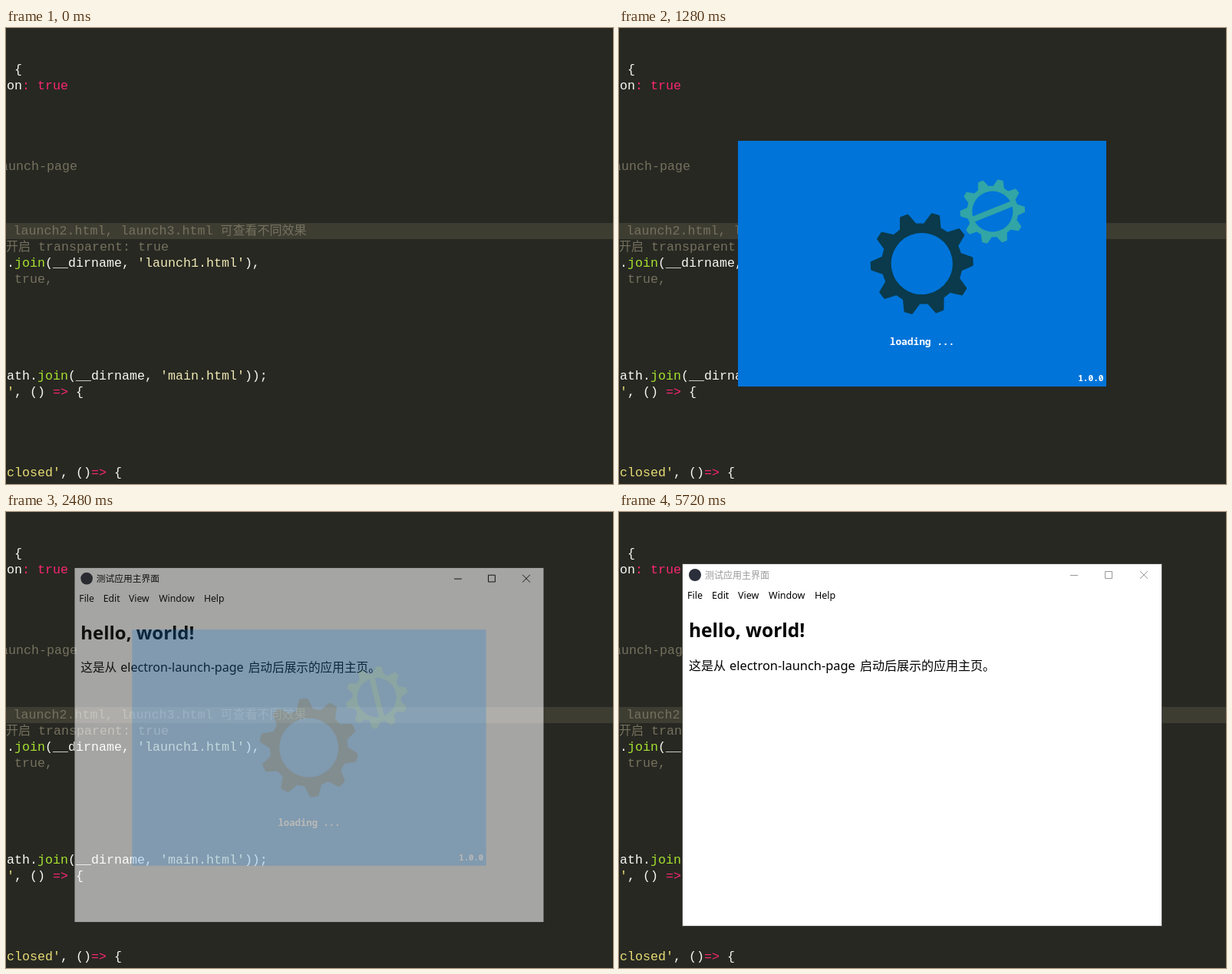
Recreate the animation shown at these times as an HTML page. Size 791 by 594 pixels, loop 5810 ms.

```html
<!DOCTYPE html>
<html lang="zh">
<head>
<meta charset="utf-8">
<title>Launch page</title>
<style>
  html, body { margin: 0; width: 100%; height: 100%; overflow: hidden; background: #272822; }
  svg { display: block; width: 100%; height: 100%; }
  text { white-space: pre; }
  #code { font: 16.667px "Liberation Mono", "Noto Sans CJK SC", "Noto Sans CJK", monospace; fill: #f8f8f2; }
  .comment { fill: #75715e; }
  .cjk { font-size: 16px; }
  .call { fill: #a6e22e; }
  .key { fill: #f92672; }
  .str { fill: #e6db74; }
  .path { fill: #efe8b4; }
  #splash text { font: bold 12.8px "Noto Sans Mono", monospace; fill: #fff; }
  #main { font-family: "Noto Sans", "Noto Sans CJK SC", "Noto Sans CJK", sans-serif; }
  #title { font: 12px "Noto Sans CJK SC", "Noto Sans CJK", sans-serif; }
  .zh { font-family: "Noto Sans CJK SC", "Noto Sans CJK", sans-serif; font-size: 16px; }
</style>
</head>
<body>
<svg viewBox="0 0 791 594">
  <rect width="791" height="594" fill="#272822"/>
  <rect y="254" width="791" height="21" fill="#3e3d32"/>
  <g id="code">
    <text x="11" y="59">{</text>
    <text x="1" y="80">on<tspan class="key">: true</tspan></text>
    <text x="-7" y="185" class="comment">aunch-page</text>
    <text x="9.5" y="269" class="comment">launch2.html, launch3.html <tspan class="cjk">可查看不同效果</tspan></text>
    <text x="0" y="290" class="comment"><tspan class="cjk">开启</tspan> transparent: true</text>
    <text x="-9" y="311">h.<tspan class="call">join</tspan>(__dirname, <tspan class="path">'launch1.html'</tspan>),</text>
    <text x="11" y="332" class="comment">true,</text>
    <text x="1" y="458">ath.<tspan class="call">join</tspan>(__dirname, <tspan class="path">'main.html'</tspan>));</text>
    <text x="1" y="479"><tspan class="str">'</tspan>, () <tspan class="key">=&gt;</tspan> {</text>
    <text x="1" y="584"><tspan class="str">closed'</tspan>, ()<tspan class="key">=&gt;</tspan> {</text>
  </g>

  <g id="main">
    <rect id="frame" x="82.5" y="67.5" width="625" height="472" fill="none"/>
    <rect x="83" y="68" width="624" height="471" fill="#fff"/>
    <circle cx="99" cy="82" r="8" fill="#2b2e3b"/>
    <text id="title" x="112" y="86.7">测试应用主界面</text>
    <path id="buttons" fill="none" d="M588 82.5h10M633.5 77.5h9v9h-9zM679 77l10 10m0-10l-10 10"/>
    <g font-size="12.5">
      <text x="89" y="113">File</text>
      <text x="121" y="113">Edit</text>
      <text x="155" y="113">View</text>
      <text x="195" y="113">Window</text>
      <text x="255" y="113">Help</text>
    </g>
    <text x="91" y="163" font-size="24.5" font-weight="bold">hello, world!</text>
    <text x="91" y="206" class="zh">这是从</text>
    <text x="144" y="206" font-size="16.4">electron-launch-page</text>
    <text x="314" y="206" class="zh">启动后展示的应用主页。</text>
  </g>

  <g id="splash">
    <rect x="155" y="147" width="480" height="320" fill="#0074d9"/>
    <g id="bigGear" fill="#0a3a4b" stroke="#0a3a4b"><path/></g>
    <g id="smallGear" fill="#32a5a6" stroke="#32a5a6">
      <path/>
      <path d="M-28 0H28" stroke-width="7.5"/>
    </g>
    <text x="395" y="412.7" text-anchor="middle">loading ...</text>
    <text x="631.5" y="460" text-anchor="end" style="font-size:11.1px">1.0.0</text>
  </g>
</svg>
<script>
const LOOP = 5810, STEP = 60;
const SPLASH_OPEN = 440, SPLASH_CLOSE = 2360, MAIN_OPEN = 2420, BLUR = 5720;
const el = id => document.getElementById(id);
const clamp = v => Math.max(0, Math.min(1, v));

// Ten-toothed ring; the round-joined stroke softens the corners.
function gearPath(hole, root, tip, offset, stroke) {
  const half = stroke / 2, points = [];
  const add = (r, deg) => {
    const a = deg * Math.PI / 180;
    points.push(`${(r - half) * Math.cos(a)} ${(r - half) * Math.sin(a)}`);
  };
  for (let i = 0; i < 10; i++) {
    const mid = offset + i * 36;
    add(root, mid - 11.5);
    add(tip, mid - 4);
    add(tip, mid + 4);
    add(root, mid + 11.5);
  }
  const r = hole + half;
  return `M${points.join('L')}ZM${r} 0A${r} ${r} 0 1 0 ${-r} 0A${r} ${r} 0 1 0 ${r} 0Z`;
}

function setupGear(id, stroke, ...shape) {
  const path = el(id).querySelector('path');
  path.setAttribute('d', gearPath(...shape, stroke));
  path.setAttribute('fill-rule', 'evenodd');
  path.setAttribute('stroke-width', stroke);
  path.setAttribute('stroke-linejoin', 'round');
}
setupGear('bigGear', 3, 40, 53, 67, 0);
setupGear('smallGear', 2, 26.5, 33.5, 42.3, 18);

// Windows grow slightly while fading in and shrink while fading out.
function showWindow(id, alpha, cx, cy) {
  const node = el(id), scale = 0.95 + 0.05 * alpha;
  node.setAttribute('visibility', alpha > 0 ? 'visible' : 'hidden');
  node.setAttribute('opacity', alpha);
  node.setAttribute('transform', `translate(${cx} ${cy}) scale(${scale}) translate(${-cx} ${-cy})`);
}

const fadeIn = (t, start) => t < start ? 0 : 1 - (1 - clamp((t - start) / 300 + 0.155)) ** 2;
const fadeOut = (t, start) => (1 - clamp((t - start) / 226)) ** 2;

function draw(time) {
  const t = time % LOOP;
  const step = Math.floor((t - SPLASH_OPEN) / STEP);
  const tick = SPLASH_OPEN + step * STEP;
  const turn = Math.min(step, (SPLASH_CLOSE - SPLASH_OPEN) / STEP) - 2;

  showWindow('splash', fadeIn(tick, SPLASH_OPEN) * fadeOut(tick, SPLASH_CLOSE), 395, 307);
  showWindow('main', fadeIn(tick, MAIN_OPEN), 395, 303.5);
  el('bigGear').setAttribute('transform', `translate(394.7 307) rotate(${2.79 * turn})`);
  el('smallGear').setAttribute('transform', `translate(486.8 239) rotate(${33 - 4.57 * turn})`);

  const active = t < BLUR;
  el('title').setAttribute('fill', active ? '#000' : '#999');
  el('buttons').setAttribute('stroke', active ? '#000' : '#999');
  el('frame').setAttribute('stroke', active ? '#22231e' : '#4a4b46');
}

const begin = performance.now();
function loop() {
  draw(performance.now() - begin);
  requestAnimationFrame(loop);
}
loop();
</script>
</body>
</html>
```
